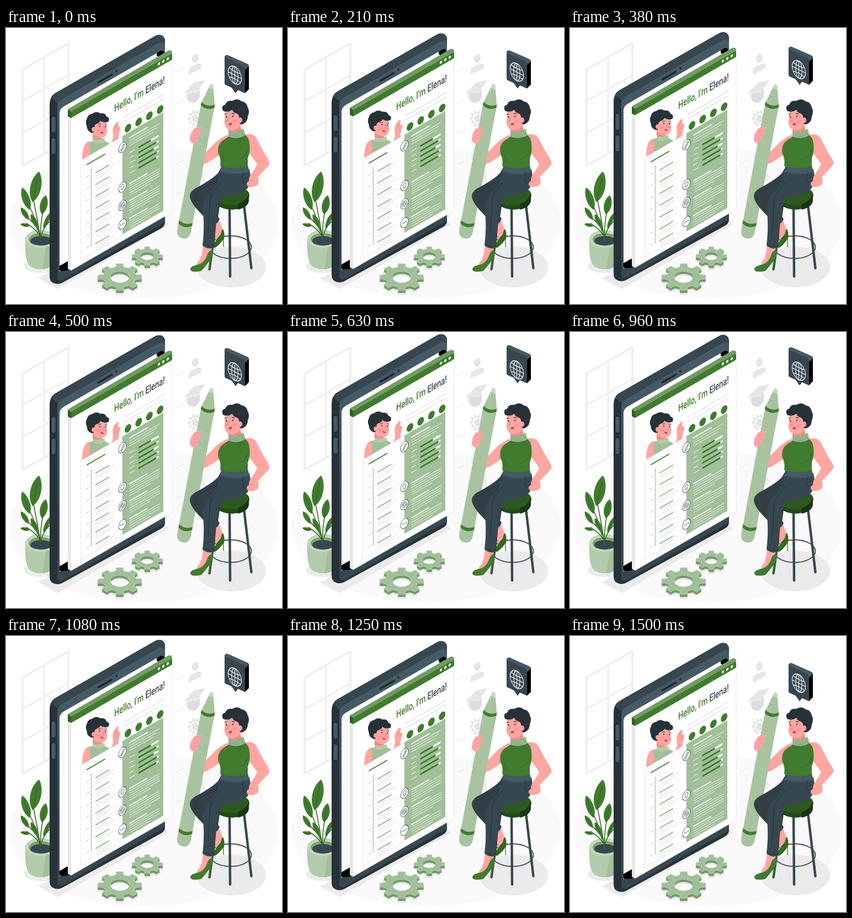
Write an HTML page that moves like this. It is 500 px wide and 500 px high and loops after 1540 ms.

```html
<!DOCTYPE html>
<html lang="en">
<head>
<meta charset="utf-8">
<title>Online resume</title>
<style>
html, body { margin: 0; width: 100%; height: 100%; overflow: hidden; background: #fff; }
svg { display: block; width: 100vw; height: 100vh; }
text { font-family: Roboto, sans-serif; font-weight: 500; }
</style>
</head>
<body>
<svg id="stage" viewBox="0 0 500 500"></svg>
<script>
const G = '#407b2e', L = '#a1bf98', D = '#37474f', K = '#263238', S = '#ffa5a2', W = '#fff';

const path = (d, fill, extra = '') => `<path d="${d}" fill="${fill}" ${extra}/>`;
const stroke = (d, color, w = 1, extra = '') =>
  `<path d="${d}" fill="none" stroke="${color}" stroke-width="${w}" stroke-linecap="round" stroke-linejoin="round" ${extra}/>`;
const oval = (x, y, rx, ry, fill, extra = '') =>
  `<ellipse cx="${x}" cy="${y}" rx="${rx}" ry="${ry}" fill="${fill}" ${extra}/>`;
const rect = (x, y, w, h, fill, extra = '') =>
  `<rect x="${x}" y="${y}" width="${w}" height="${h}" fill="${fill}" ${extra}/>`;
const row = (x1, x2, y, color, w) => stroke(`M${x1} ${y}H${x2}`, color, w);
const group = (attrs, ...parts) => `<g ${attrs}>${parts.join('')}</g>`;

// Teardrop leaf from base to tip, fullest near the base.
function leaf(x1, y1, x2, y2, w) {
  const dx = x2 - x1, dy = y2 - y1, len = Math.hypot(dx, dy);
  const at = (k, side) => `${(x1 + dx * k - dy / len * side).toFixed(1)} ${(y1 + dy * k + dx / len * side).toFixed(1)}`;
  return path(`M${x1} ${y1}C${at(.2, w)} ${at(.75, w)} ${x2} ${y2}C${at(.75, -w)} ${at(.2, -w)} ${x1} ${y1}Z`, G) +
    stroke(`M${x1} ${y1}L${at(.8, 0)}`, '#2c5720', .8);
}

function gearPath(cx, cy, r, n, flat, hole) {
  const pts = [];
  for (let i = 0; i < n; i++) {
    [[-.3, .76], [-.2, 1], [.2, 1], [.3, .76]].forEach(([a, k]) => {
      const t = (i + a) / n * Math.PI * 2;
      pts.push(`${(cx + Math.cos(t) * r * k).toFixed(1)} ${(cy + Math.sin(t) * r * k * flat).toFixed(1)}`);
    });
  }
  const h = r * hole, v = h * flat;
  return `M${pts.join('L')}ZM${cx - h} ${cy}a${h} ${v} 0 1 0 ${2 * h} 0a${h} ${v} 0 1 0 ${-2 * h} 0Z`;
}

function floorGear(cx, cy, r) {
  const d = gearPath(cx, cy, r, 8, .61, .43), even = 'fill-rule="evenodd"';
  let s = path(d, '#e3e6e1', `${even} transform="translate(0 7)" stroke="#e9ebe8" stroke-width="3"`);
  for (let i = 5; i > 0; i--) s += path(d, '#76996b', `${even} transform="translate(0 ${i})"`);
  return s + path(d, L, `${even} stroke="#c5d7bf" stroke-width=".8"`);
}

function room() {
  const c = '#f0f0f0';
  return oval(250, 352, 244, 139, '#fafafa') +
    stroke('M30 75L113 28V204L30 249Z', c, 4) +
    stroke('M69 53V228M30 132L113 86M30 190L113 145', c, 3.4) +
    path('M57 453L94 473L294 357L287 346Z', '#ebebeb') +
    oval(62, 431, 30, 13, '#ebebeb') +
    oval(408, 433, 63, 37, '#ebebeb');
}

function plant() {
  return path('M35 382Q33 420 43 431Q62 443 83 431Q93 420 91 382Z', '#b3caab') +
    path('M72 398Q86 394 91 382Q93 420 83 431Q77 436 66 437Z', L) +
    oval(63, 382, 28.5, 16, '#c5d7bf') + oval(63, 383, 22, 11.5, '#7ea373') +
    oval(63.5, 385.5, 19.5, 8.5, D) +
    stroke('M63 387Q58 350 50 312M62 378Q63 350 67 332M60 370Q52 342 42 322M61 376Q52 362 37 354M63 378Q68 360 80 350M60 370Q50 350 36 342', '#35681f', 1.5) +
    leaf(48, 315, 60, 260, 13) + leaf(65, 337, 72, 303, 9) + leaf(43, 329, 29, 289, 9) +
    leaf(41, 347, 27, 325, 6) + leaf(42, 359, 26, 355, 4) + leaf(57, 361, 45, 337, 6) +
    leaf(68, 363, 80, 335, 5);
}

function sideIcons() {
  const c = '#e6e6e6';
  const dots = [[307, 79], [307, 137], [307, 192], [308, 247], [308, 303]]
    .map(([x, y]) => stroke(`M${x} ${y}l14 -8`, '#d5d5d5', .9, 'stroke-dasharray="2 3"')).join('');
  return dots + oval(343, 55, 6.2, 8, c, 'transform="rotate(18 343 55)"') +
    path('M331 84V77Q333 69 343 67Q350 62 354 66V73Z', c) +
    path('M328 113L351 107V125Q347 135 338 136Q330 134 328 128Z', '#dedede') +
    path('M322 118L341 98L362 94L347 116Z', c, 'stroke="#fff" stroke-width=".6"') +
    stroke('M326 115V126', '#d5d5d5', 1) +
    path(gearPath(343, 164, 14, 10, 1.1, .62), c, 'fill-rule="evenodd"') +
    oval(343, 164, 6.5, 7.5, c) +
    oval(338, 233, 6, 9, '#ededed') + path('M345 268L359 260V276L345 285Z', '#ededed');
}

function tablet() {
  const shade = '<linearGradient id="bezel" x1="0" y1="0" x2="0" y2="1">' +
    `<stop offset=".3" stop-color="#455a64"/><stop offset=".7" stop-color="${D}"/></linearGradient>`;
  return shade +
    path('M79 139Q79 125 88 119L271 14Q284 9 288 21V352Q288 359 281 363L101 462Q92 466 84 461Q79 458 79 449Z', K) +
    path('M82 126Q84 121 89 118L271 14Q284 9 288 21V30L96 139Z', D) +
    path('M93 143Q93 134 101 129L275 28Q288 22 288 34V348Q288 352 283 355L103 457Q93 461 93 451Z', 'url(#bezel)') +
    path('M97 153Q98 146 105 142L274 45Q287 39 287 50V340L97 441Z', '#fafafa') +
    path('M273 45.500L280 41.500Q287 39 287 50V60L273 50Z', '#000') +
    path('M97 431L113 422V439L102 440Q97 441 97 437Z', '#000') +
    stroke('M167 98.500L192 84', K, 3.4) + stroke('M168 98.500L191 85.300', '#111a1e', 1.3) +
    oval(200, 78, 2, 2.4, K) +
    stroke('M85.5 164V186M85.5 203V225', '#151f24', 10) +
    stroke('M86 164V186M86 203V225', '#455a64', 7.5);
}

// Head looking to the left, shared by both figures.
function head() {
  return path('M397 148Q411 141 427 152V173Q423 184 410 186Q399 185 396 174Z', S) +
    path('M393 150Q389 141 397 139Q400 130 410 132Q419 126 427 133Q436 134 438 144Q442 151 438 160Q438 169 431 173Q426 177 423 172Q421 169 422 163Q423 157 418 155Q411 153 410 148Q402 154 393 150Z', K) +
    oval(424, 167, 4, 5, S) +
    stroke('M423 167q2 -2 3 0', '#e5817c', .8) +
    oval(399.5, 161, 1.1, 1.6, K) + oval(411, 160, 1.1, 1.6, K) +
    stroke('M396.500 157l3 -1.500M409 155q3 -1 5 1', K, 1.1) +
    stroke('M404 161L401 168L404 169', '#e5736f', 1) +
    path('M403 174Q406 172 410 172Q409 177 404 176Z', '#b9423f') +
    oval(414, 169, 3.3, 2.6, '#ff8f8b') + oval(398, 169, 1.8, 2.2, '#ff8f8b');
}

function portrait() {
  return path('M138 239Q138 211 149 206L160 204V240Z', S) +
    path('M185 205L197 224L203 205Q204 199 204 194L207 182Q207 175 203 180L204 171Q202 167 199 173Q194 177 193 186Q195 195 193 203L188 212Z', S) +
    stroke('M200 175L198 184M204 180L201 188', '#e5817c', .7) +
    path('M157 186H174V207H157Z', '#f08d87') +
    path('M157 201Q166 205 178 199L179 205Q187 207 189 215V245H150Q154 225 151 207L157 206Z', L) +
    path('M157 200Q167 205 178 199L179 206Q168 212 157 207Z', '#b3caab') +
    group('transform="translate(186.500 153) scale(-.87 .83) translate(-392 -130)"', head());
}

// Local x runs along the sheet; the skew gives the isometric slope.
const sheet = (...parts) => group('transform="translate(118 0) skewY(-30)"', ...parts);

function badge(v, icon) {
  return oval(93, v, 7, 8.6, W, `stroke="${D}" stroke-width=".8"`) +
    group(`transform="translate(93 ${v})"`, icon);
}

function details() {
  let s = rect(17, 250, 76, 180, '#fdfdfd', 'stroke="#e2e2e2" stroke-width=".8"');
  s += rect(93, 249.5, 74, 178, L) + row(29, 61, 264, G, 2);
  s += stroke('M36.5 276V413', '#9aa3a7', .7);
  for (let i = 0; i < 7; i++) {
    const v = 288 + i * 21.4;
    s += row(45, 68, v, L, 2.4);
    [4.5, 8, 11.5].forEach((d, k) => s += row(45, 78 - (i + k) % 3 * 6, v + d, '#dcdcdc', .7));
    s += row(28, 32, v - 2, '#b5bcbf', 1);
    [0, 7.1, 14.2].forEach(d => {
      if (v - 9 + d < 415) s += oval(36.5, v - 9 + d, 1.2, 1.4, W, 'stroke="#8c979c" stroke-width=".5"');
    });
  }
  s += row(106, 138, 260, W, 2);
  [265.5, 270, 274.5].forEach((v, i) => s += row(106, 160 - i * 5, v, W, .8));
  [20, 30, 25, 31, 30].forEach((w, i) => {
    const v = 287 + i * 9.3;
    s += row(106, 115 - i % 2 * 2, v, W, 1) + row(123, 157, v, W, 3.6) + row(123, 123 + w, v, G, 3.6);
  });
  [[343, 5], [374, 5], [406, 4]].forEach(([v, n]) => {
    s += row(106, 137, v, W, 2);
    for (let i = 1; i <= n; i++) s += row(106, i === n ? 144 : 160, v + i * 4.3, W, .8);
  });
  s += badge(270, stroke('M-3 4L2 -5L4 -3L-1 5L-3 5Z', D, .7));
  s += badge(342, stroke('M-1.5 4H1.5V2Q4 -1 2 -4Q0 -6 -2 -4Q-4 -1 -1.5 2Z', D, .7));
  s += badge(375, [1.5, 3, 4.5].map(r => oval(0, 0, r, r * 1.2, 'none', `stroke="${D}" stroke-width=".6"`)).join(''));
  s += badge(409, [-3, 0, 3].map(x => oval(x, 0, .9, 1, D)).join(''));
  return s;
}

function page() {
  let top = rect(0, 151, 183, 288, W) +
    path('M0 151H181Q183 151 183 154V163H0Z', G) +
    [159, 167, 175].map(x => oval(x, 156.7, 2.1, 2.5, W)).join('') +
    `<text transform="translate(78 197.5) scale(.7 1)" font-size="18.5" fill="${G}">Hello, I'm <tspan fill="${D}">Elena!</tspan></text>` +
    row(96, 168, 217, '#dedede', 1.4) + row(96, 168, 225, '#dedede', 1.4);
  for (let i = 0; i < 4; i++) top += oval(103 + i * 19.4, 240.8, 6, 7, G);
  return path('M112 159L118 163V439.500L112 436Z', '#e8e8e8') +
    path('M112 147L118 151V163L112 160Z', '#2f6020') +
    path('M112 147L293 41.500Q298 39 301 43V46L118 151.500Z', '#729b64') +
    sheet(top) + portrait() + sheet(details()) +
    stroke('M118.300 439L299 335Q301 334 301 331V62', '#e4e4e4', .8);
}

function bubble() {
  return path('M396 54Q396 48 402 49.500L437 65Q440 66 440 70V111L433 118L420 112L416 118L409 108L398 103Q396 102 396 99Z', '#000') +
    path('M396 54Q397 48 402 49.500L437 65Q440 67 440 69L434 75L397 57Z', '#455a64') +
    path('M396 57Q396 53 400 55L430 69Q433 70 433 75V118L418.500 111.500L416 118L409.500 107.500L398 103Q396 102 396 99Z', D);
}

function globe() {
  const ring = rx => oval(0, 0, rx, 15.5, 'none');
  return group(`transform="translate(414.500 85.500) matrix(.82 .42 0 1 0 0)" stroke="${W}" stroke-width="1.3" fill="none"`,
    ring(14.8), ring(7), '<path d="M0 -15.500V15.500M-14.800 0H14.800M-12.500 -8Q0 -5 12.500 -8M-12.500 8Q0 5 12.500 8"/>');
}

function stool() {
  return oval(407, 397, 37.5, 20.5, 'none', `stroke="${D}" stroke-width="1.8"`) +
    stroke('M385 322L368.500 437M405 325L406 450M431 320L444.500 435', D, 4.4) +
    path('M373 301V314Q390 330 411 329Q437 327 440 313V298Z', '#24491a') +
    oval(407, 303, 34, 18, '#2c591f') +
    path('M420 329Q438 325 440 313V298Q438 312 420 319Z', '#1a3512');
}

function pencil() {
  return group('transform="translate(373 101) rotate(10.700)"',
    path('M-12.500 38L-3 3Q0 -2 3 3L12.500 38V272Q12 285 0 285Q-12 285 -12.500 272Z', '#a8c3a0'),
    path('M-5 10L-3 3Q0 -2 3 3L5 10Q0 7 -5 10Z', '#c9d8c4'),
    path('M-12.500 36Q0 44 12.500 36V42Q0 50 -12.500 42Z', G),
    path('M-12.500 254Q0 262 12.500 254V260Q0 268 -12.500 260Z', G));
}

function shoes() {
  return path('M376 350L385 346L393 367L394 379L380 386Z', S) +
    path('M374 398Q378 385 389 374Q391 364 393 364Q397 372 395 381L390 388Q384 395 379 398Z', '#35681f') +
    stroke('M394 376V396', '#35681f', 1.3) +
    path('M358 387L376 389L369 411Q364 424 353 430L346 427Q353 418 355 408Z', S) +
    path('M334 437Q334 431 350 428Q361 424 366 407L374 400Q376 410 371 419Q362 431 354 440Q342 443 335 440Z', G) +
    stroke('M372 411L367.500 437', G, 1.6);
}

function trousers() {
  const crease = '#24333b';
  return path('M389 254L420 258L400 296L370 309L364 314L372 325L387 346Q384 354 376 356L358 341Q334 318 333 305Q333 297 342 291Q371 276 384 263Z', '#323f47') +
    path('M390 254L441 256Q446 279 437 291Q424 303 401 305Q386 310 383 327L377 397Q367 403 356 394Q360 360 357 335Q355 316 366 303L382 284Z', D) +
    path('M390 249Q414 255 438 249L441 261Q414 268 388 260Z', '#455a64') +
    stroke('M390 280Q372 296 369 313Q369 340 366 370M431 262Q425 274 433 281M357 391Q367 399 377 394M343 300Q360 286 382 278', crease, 1);
}

const farArm = () =>
  path('M403 193Q388 198 375 212L358 229L351 243Q360 249 368 242L392 227Z', S);

function torso() {
  return path('M403 178L425 176L429 203Q413 211 403 200Z', '#ef8a85') +
    path('M434 193Q448 190 454 200Q463 218 475 238Q480 245 475 250L456 270Q460 279 455 285Q446 290 438 287Q433 281 440 277Q440 268 446 262L456 246L438 224Z', S) +
    stroke('M449 273Q445 276 441 278M456 247Q453 245 452 241', '#e5817c', .9) +
    path('M405 193L430 193Q436 193 440 203Q444 222 438 236V251Q414 257 388 250Q390 238 385 228Q381 211 395 202Q402 199 405 193Z', G) +
    path('M404 186Q416 192 430 182L434 194Q420 203 403 197Z', '#8fb384') +
    stroke('M391 229Q396 238 393 244M438 221Q434 232 426 236', '#2f6020', .9);
}

function grip() {
  return path('M333 204Q333 191 338 186Q342 178 354 179Q358 181 354 184L349 187Q355 190 352 194L347 196Q350 201 346 204L342 209Q337 211 333 204Z', S) +
    stroke('M341 187L349 186M340 194L350 193M340 201L346 199', '#e5817c', .8);
}

const stage = document.getElementById('stage');
stage.innerHTML = room() + plant() +
  group('id="device"', tablet(), page()) +
  floorGear(206, 451, 40) + floorGear(256, 413, 28) + sideIcons() +
  group('id="bubble"', bubble()) + group('id="globe"', globe()) +
  stool() + farArm() + pencil() + grip() + shoes() + trousers() + torso() + head();

const LOOP = 1540, FLOAT = 1500;
const lifts = [['device', 10], ['bubble', 30], ['globe', 20]]
  .map(([id, h]) => [document.getElementById(id), h]);

// Linear rise and fall, then a short rest before the loop restarts.
function draw(t) {
  const p = Math.min(t % LOOP, FLOAT) / FLOAT;
  const k = 1 - Math.abs(1 - 2 * p);
  lifts.forEach(([el, h]) => el.setAttribute('transform', `translate(0 ${(-h * k).toFixed(3)})`));
}

const start = performance.now();
function tick() {
  draw(performance.now() - start);
  requestAnimationFrame(tick);
}
draw(0);
requestAnimationFrame(tick);
</script>
</body>
</html>
```
